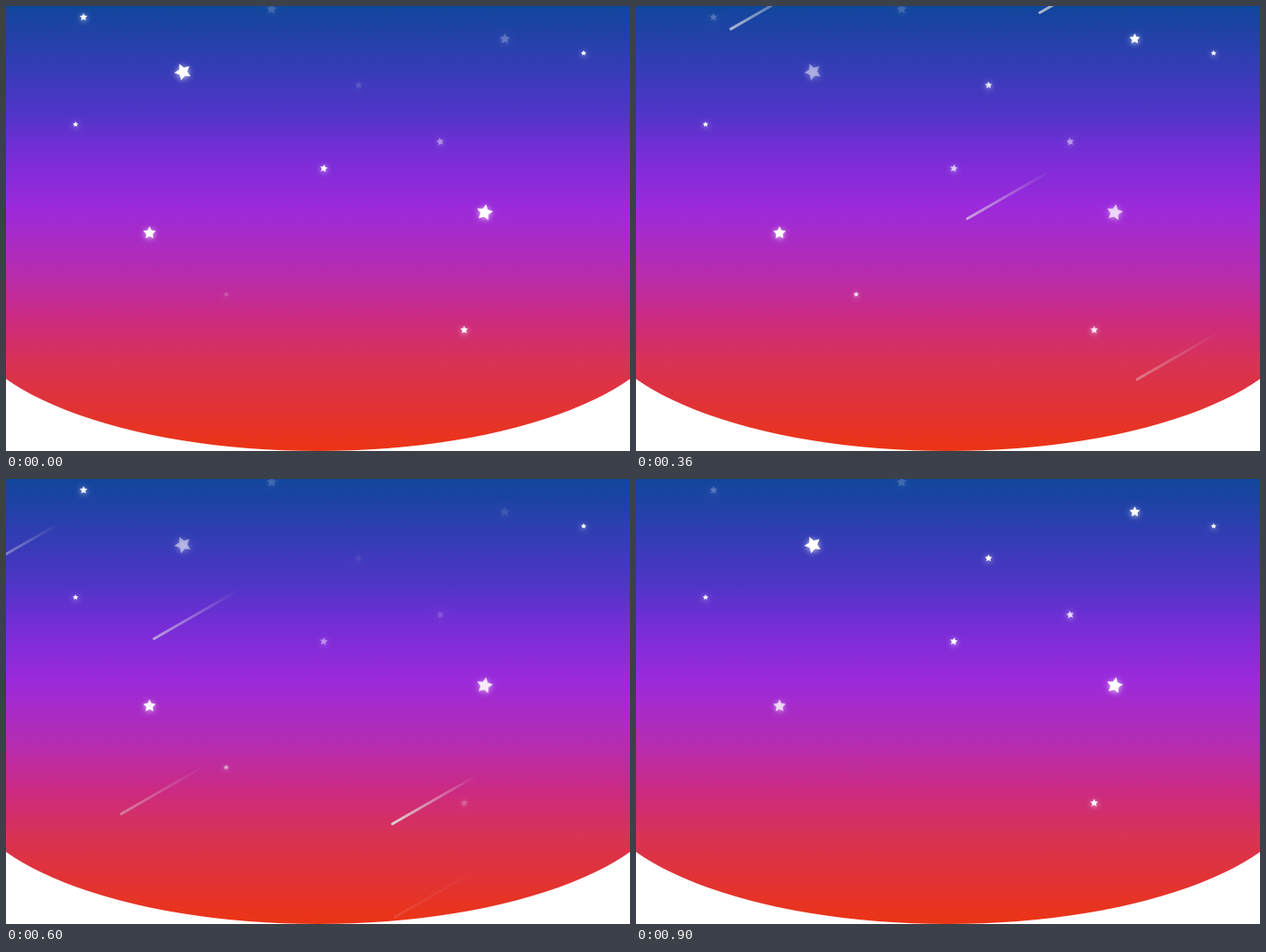
An HTML page with a canvas for the animation above (930 ms loop, 700 px wide and 500 px high).

```html
<!DOCTYPE html>
<html lang="en">
<head>
<meta charset="utf-8">
<title>Shooting stars</title>
<style>
  html, body { margin: 0; width: 100%; height: 100%; overflow: hidden; background: #fff; }
  canvas { display: block; }
</style>
</head>
<body>
<canvas id="sky" width="700" height="500"></canvas>
<script>
const ctx = document.getElementById('sky').getContext('2d');
const LOOP = 930, STEP = 30;
const TAIL = { x: 94, y: -54 };

const mix = (a, b, k) => a + (b - a) * k;
const clamp = v => Math.max(0, Math.min(1, v));

const sky = ctx.createLinearGradient(0, 0, 0, 500);
[[0, '#10469c'], [.24, '#5035c8'], [.33, '#762dd6'], [.45, '#9b2adc'],
 [.6, '#b62caf'], [.7, '#cb2a82'], [.8, '#d83256'], [1, '#eb3414']]
  .forEach(([at, color]) => sky.addColorStop(at, color));

function drawSky() {
  ctx.fillStyle = '#fff';
  ctx.fillRect(0, 0, 700, 500);
  ctx.fillStyle = sky;
  ctx.beginPath();
  ctx.rect(0, 0, 700, 343);
  ctx.ellipse(350, 343, 400, 157, 0, 0, Math.PI * 2);
  ctx.fill();
}

// Opacity swings between low and high on a cosine that tops out at `peak` ms.
function star(x, y, r, low, high = low, peak = 0, period = LOOP, turn = 0) {
  return t => {
    const wave = Math.cos((t - peak) / period * Math.PI * 2);
    ctx.save();
    ctx.globalAlpha = clamp(mix(low, high, (wave + 1) / 2));
    ctx.translate(x, y);
    ctx.rotate(turn * Math.PI / 180);
    ctx.fillStyle = '#fff';
    ctx.shadowColor = 'rgba(255,255,255,.75)';
    ctx.shadowBlur = 6;
    ctx.shadowOffsetY = 1;
    ctx.beginPath();
    for (let i = 0; i < 10; i++) {
      const radius = i % 2 ? r * .5 : r, a = i * Math.PI / 5;
      ctx.lineTo(radius * Math.sin(a), -radius * Math.cos(a));
    }
    ctx.fill();
    ctx.restore();
  };
}

// The head glides through [time, x, y] points while the opacity changes evenly.
function meteor(alphaIn, alphaOut, ...path) {
  const begin = path[0][0], end = path[path.length - 1][0];
  return t => {
    if (t < begin || t >= end) return;
    const next = path.findIndex(point => point[0] > t);
    const from = path[next - 1], to = path[next];
    const k = (t - from[0]) / (to[0] - from[0]);
    const x = mix(from[1], to[1], k), y = mix(from[2], to[2], k);
    const fade = ctx.createLinearGradient(x, y, x + TAIL.x, y + TAIL.y);
    fade.addColorStop(0, 'rgba(224,224,224,1)');
    fade.addColorStop(1, 'rgba(224,224,224,0)');
    ctx.save();
    ctx.globalAlpha = mix(alphaIn, alphaOut, (t - begin) / (end - begin));
    ctx.strokeStyle = fade;
    ctx.lineWidth = 3;
    ctx.lineCap = 'round';
    ctx.beginPath();
    ctx.moveTo(x + 1, y - .5);
    ctx.lineTo(x + TAIL.x, y + TAIL.y);
    ctx.stroke();
    ctx.restore();
  };
}

const scene = [
  drawSky,
  star(87, 12.5, 4.5, .2, 1, 640, 600),
  star(198.5, 74, 9.8, .36, 1, 0, LOOP, -24),
  star(298, 3.5, 6, .15),
  star(559.5, 37, 6.2, .05, 1.2, 350, 560),
  star(648, 53, 3.2, 1),
  star(78, 133, 3.2, 1),
  star(395.5, 89, 4.2, .07, 1, 270, 640),
  star(487, 152.5, 4.5, .1, .78, 190, 700, -10),
  star(356.5, 182.5, 4.5, .17, 1, 0, 455, 10),
  star(537, 232, 9.5, .68, 1.15, 885, LOOP, 10),
  star(161, 255, 7.5, .7, 1.12, 270, 1400),
  star(247, 324, 3.2, 0, .85, 380, 1100),
  star(514, 364, 4.5, .2, 1.3, 160, 900),
  meteor(1, .2, [0, 734, 33.5], [840, -114, 514]),
  meteor(.85, 0, [0, 750, 311], [690, 388, 520]),
  meteor(.75, .65, [240, 176, -13], [780, -142, 164]),
  meteor(.75, .5, [360, 452, 8], [540, 228, 145], [840, -87, 320]),
  meteor(1, .8, [420, 740, 235], [660, 330, 439], [840, 163, 541])
];

function render() {
  const t = Math.floor(performance.now() % LOOP / STEP) * STEP;
  scene.forEach(draw => draw(t));
  requestAnimationFrame(render);
}
render();
</script>
</body>
</html>
```
